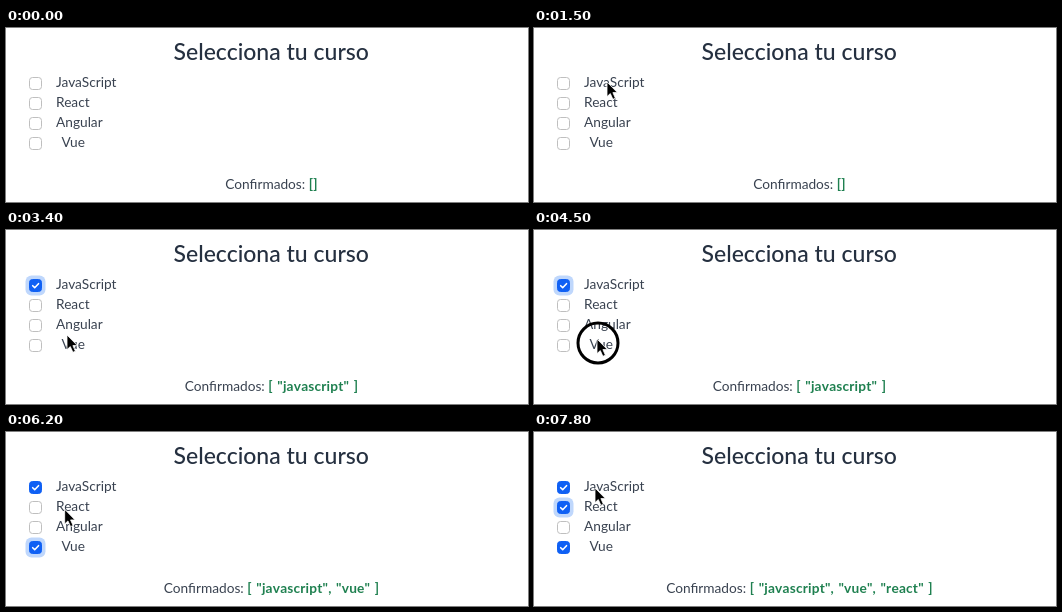
Write an HTML page that moves like this. It is 522x174 px and loops after 8 s.

```html
<!DOCTYPE html>
<html lang="es">
<head>
<meta charset="utf-8">
<title>Selecciona tu curso</title>
<style>
  html, body { margin: 0; width: 100%; height: 100%; overflow: hidden; background: #fff; }
  svg { display: block; width: 100%; height: 100%; }
  text { font: 13.7px Lato, "Open Sans", sans-serif; fill: #394250; }
  .title { font-size: 23px; font-weight: 500; fill: #253040; }
  .list { font-weight: 700; fill: #1f8050; font-kerning: none; letter-spacing: 0.2px; word-spacing: 1px; }
</style>
</head>
<body>
<svg id="stage" viewBox="0 0 522 174">
  <text class="title" x="265.2" y="31.5" text-anchor="middle">Selecciona tu curso</text>
  <g id="options"></g>
  <text x="265.5" y="161" text-anchor="middle">Confirmados: <tspan class="list" id="list">[]</tspan></text>
  <circle id="ring" fill="none" stroke="#000" stroke-width="3"/>
  <path id="cursor" d="M0 0V14.6L3.3 11.6L5.9 17.3L8.4 16.2L5.9 10.6H10.4Z" fill="#000" stroke="#fff" stroke-width="0.8"/>
</svg>
<script>
const LOOP = 8000, STEP = 100;
const BLUE = "#0f60f4";
const $ = id => document.getElementById(id);

const labels = ["JavaScript", "React", "Angular", "Vue"];

// Each click: ring start and end, ring radii, time the box is ticked, option index
const clicks = [
  { from: 1800, to: 2200, r0: 12, r1: 36, tick: 1900, option: 0 },
  { from: 4500, to: 4800, r0: 20, r1: 36, tick: 4600, option: 3 },
  { from: 6700, to: 6800, r0: 25, r1: 25, tick: 6800, option: 1 }
];

// Pointer tip: time, x, y
const path = [
  [500, 226, 8], [800, 112, 44], [1000, 69, 60], [1100, 72, 62], [1300, 72, 62],
  [1500, 73, 54], [2500, 73, 54], [2600, 64, 78], [3400, 61, 105], [3500, 62, 108],
  [3600, 63, 111], [3700, 63, 109], [5000, 63, 109], [5500, 56, 92], [5900, 60, 80],
  [6000, 60, 80], [6300, 58, 76], [6900, 58, 76], [7800, 61, 56]
];

function set(el, attrs) {
  for (const key in attrs) el.setAttribute(key, attrs[key]);
}

function add(parent, tag, attrs) {
  const el = document.createElementNS("http://www.w3.org/2000/svg", tag);
  set(el, attrs);
  return parent.appendChild(el);
}

const boxes = labels.map((label, i) => {
  const y = 55.5 + 20 * i;
  const g = add($("options"), "g", { transform: `translate(29.5 ${y})` });
  const glow = add(g, "rect", { x: -10, y: -10, width: 20, height: 20, rx: 6, fill: "#bfd7fc" });
  const box = add(g, "rect", { x: -6, y: -6, width: 12, height: 12, rx: 3 });
  const mark = add(g, "path", {
    d: "M-2.8 .2L-.8 2.2L3 -1.8", fill: "none", stroke: "#fff",
    "stroke-width": 1.6, "stroke-linecap": "round", "stroke-linejoin": "round"
  });
  add(g, "text", { x: label === "Vue" ? 26 : 20.5, y: 3.5 }).textContent = label;
  return { glow, box, mark };
});

function pointAt(t) {
  const next = path.findIndex(p => p[0] > t);
  if (next < 0) return path[path.length - 1].slice(1);
  const [t0, x0, y0] = path[next - 1], [t1, x1, y1] = path[next];
  const k = (t - t0) / (t1 - t0);
  return [x0 + (x1 - x0) * k, y0 + (y1 - y0) * k];
}

function show(el, on) {
  set(el, { visibility: on ? "visible" : "hidden" });
}

function render(time) {
  const t = Math.floor((time % LOOP) / STEP) * STEP;
  const chosen = clicks.filter(c => t >= c.tick).map(c => c.option);
  const focused = chosen[chosen.length - 1];

  boxes.forEach(({ glow, box, mark }, i) => {
    const on = chosen.includes(i);
    show(glow, i === focused);
    show(mark, on);
    set(box, { fill: on ? BLUE : "#fff", stroke: on ? BLUE : "#bfbfbf" });
  });

  const names = chosen.map(i => `"${labels[i].toLowerCase()}"`).join(", ");
  $("list").textContent = names ? `[ ${names} ]` : "[]";

  const visible = t >= path[0][0];
  const [x, y] = visible ? pointAt(t) : [0, 0];
  show($("cursor"), visible);
  set($("cursor"), { transform: `translate(${x} ${y})` });

  const click = clicks.find(c => t >= c.from && t < c.to);
  show($("ring"), click);
  if (click) {
    const k = (t - click.from) / Math.max(STEP, click.to - STEP - click.from);
    set($("ring"), {
      cx: x + 1, cy: y + 4, r: click.r0 + (click.r1 - click.r0) * k,
      opacity: 1 - 0.7 * k
    });
  }
}

function frame() {
  render(performance.now());
  requestAnimationFrame(frame);
}
frame();
</script>
</body>
</html>
```
